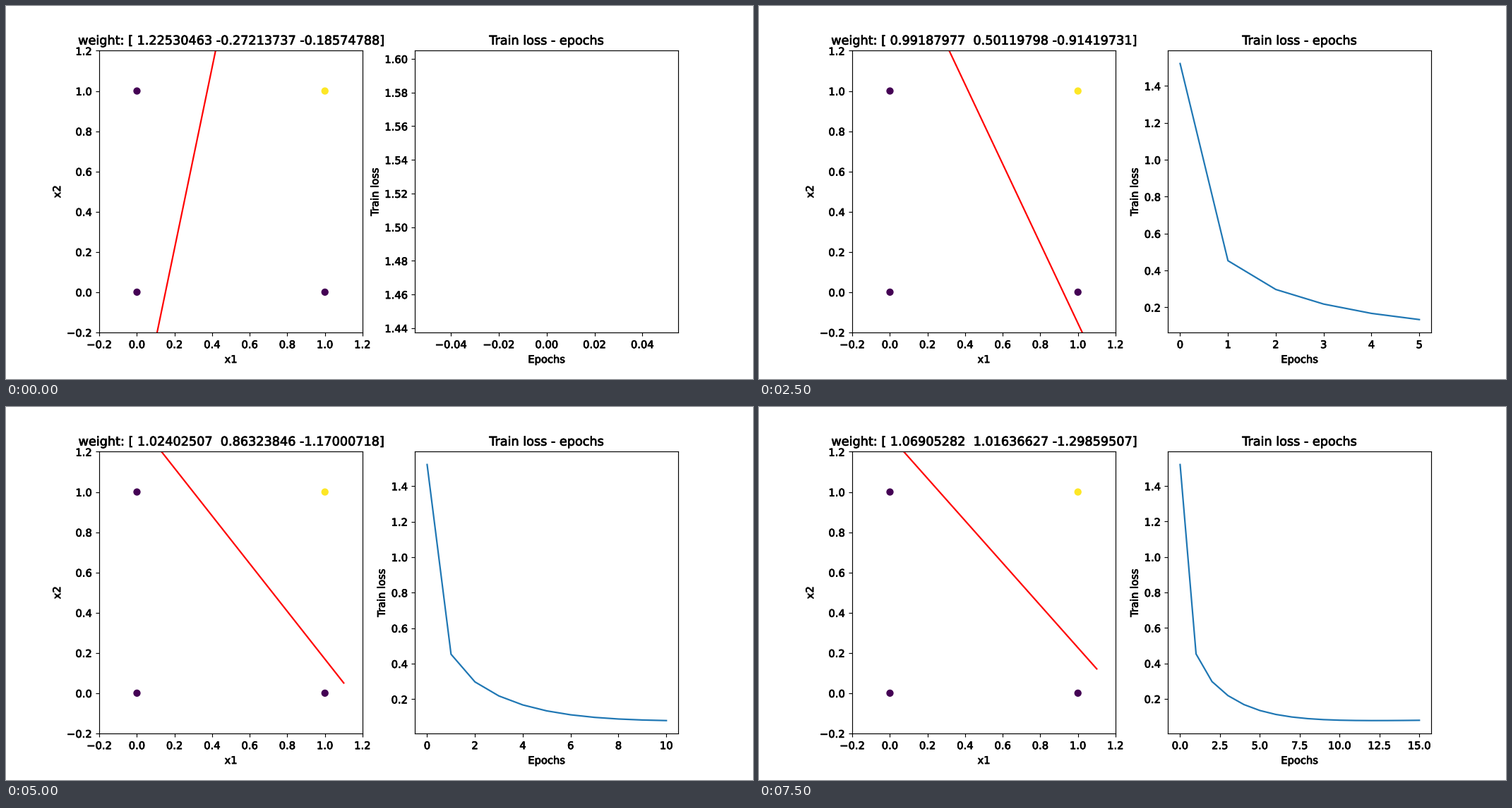
These frames come from a looping animation (1058 px wide and 529 px high, 8000 ms). A matplotlib script:

```python
import numpy as np
import matplotlib.pyplot as plt
from matplotlib.animation import FuncAnimation
from matplotlib.patheffects import withStroke
from matplotlib.text import Text

EPOCHS = 16
RATE = 0.2
START = [2.124448622, 0.252646122, 1.454178754]
HEAVY = [withStroke(linewidth=0.5, foreground="black")]

# AND gate with a constant bias input, labels -1 / +1
X = np.array([[0, 0, 1], [0, 1, 1], [1, 0, 1], [1, 1, 1]], float)
T = np.array([-1, -1, -1, 1], float)
BATCHES = [[1, 2], [0, 3]]


def train():
    """Mini-batch gradient descent on a linear neuron."""
    w = np.array(START)
    weights, losses = [], []
    for _ in range(EPOCHS):
        total = 0
        for batch in BATCHES:
            x, t = X[batch], T[batch]
            w = w - RATE * x.T @ (x @ w - t)
            total += np.mean((x @ w - t) ** 2)
        weights.append(w)
        losses.append(total / len(BATCHES))
    return weights, losses


weights, losses = train()
fig, (left, right) = plt.subplots(1, 2, figsize=(10, 5), dpi=105.8)
fig.subplots_adjust(bottom=0.125)


def draw_boundary(w):
    left.cla()
    x1 = np.array([-0.1, 1.1])
    left.plot(x1, -(w[0] * x1 + w[2]) / w[1], color="red")
    left.scatter(X[:, 0], X[:, 1], c=T)
    left.set(xlim=(-0.2, 1.2), ylim=(-0.2, 1.2), xlabel="x1", ylabel="x2")
    left.set_title(f"weight: {w}")


def draw_loss(values):
    right.cla()
    right.plot(range(len(values)), values)
    right.set(xlabel="Epochs", ylabel="Train loss")
    right.set_title("Train loss - epochs")


def thicken_text():
    fig.draw_without_rendering()  # settles the tick labels first
    for text in fig.findobj(Text):
        text.set_path_effects(HEAVY)


def update(epoch):
    draw_boundary(weights[epoch])
    draw_loss(losses[:epoch + 1])
    thicken_text()
    return []


anim = FuncAnimation(fig, update, frames=EPOCHS, init_func=lambda: update(0),
                     interval=500, repeat=True, repeat_delay=0)
plt.show()
```
